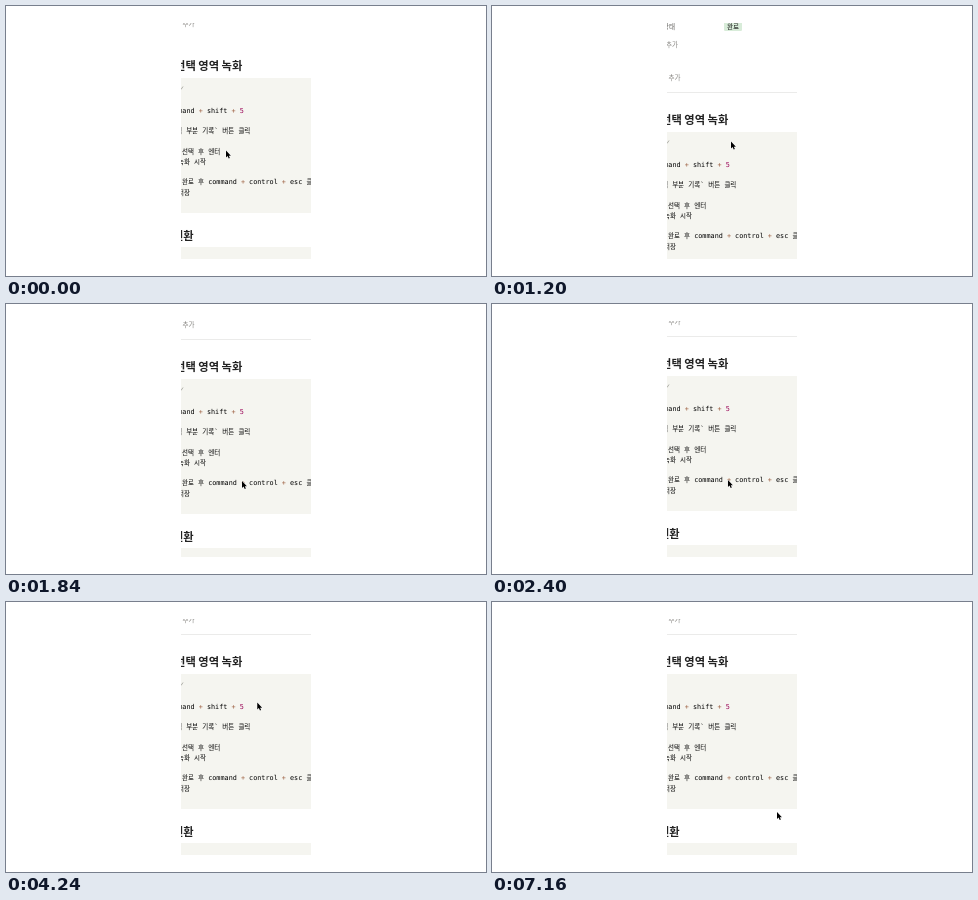
An HTML page with a canvas for the animation above (7760 ms loop, 480 by 270 pixels).

```html
<!DOCTYPE html>
<html lang="ko">
<head>
<meta charset="utf-8">
<style>
html, body { margin: 0; width: 100%; height: 100%; overflow: hidden; background: #fff; }
canvas { display: block; }
</style>
</head>
<body>
<canvas id="stage" width="480" height="270"></canvas>
<script>
const ctx = document.getElementById('stage').getContext('2d');
const LOOP = 7760, STEP = 40;
const LEFT = 175, TOP = 17, WIDTH = 130, HEIGHT = 236;
const SANS = '"Noto Sans CJK KR", "Noto Sans CJK", sans-serif';
const MONO = '"DejaVu Sans Mono", monospace';
const INK = '#111', GRAY = '#83817d', BLOCK = '#f5f5f0';

const snippet = `
command + shift + 5

\`선택 부분 기록\` 버튼 클릭

영역 선택 후 엔터
화면녹화 시작

녹화 완료 후 command + control + esc 클릭
자동저장`.split('\n');

// Pointer moves; it rests in between
const moves = [
  { from: 800, to: 1200, x: 239, y: 135.5 },
  { from: 1200, to: 1520, x: 237.5, y: 178.5 },
  { from: 1520, to: 1840, x: 236, y: 177 },
  { from: 2360, to: 2960, x: 233, y: 100 },
  { from: 3240, to: 3600, x: 240, y: 60 },
  { from: 3600, to: 3920, x: 247, y: 89 },
  { from: 4200, to: 4400, x: 288, y: 199 },
  { from: 5160, to: 5760, x: 285, y: 210 }
];
const arrow = new Path2D('M0 0V7L1.6 5.6 2.7 8 3.9 7.5 2.8 5.2H4.9Z');

const progress = (t, from, to) => Math.max(0, Math.min(1, (t - from) / (to - from)));
const smooth = k => k * k * (3 - 2 * k);

// Scroll up with a soft stop, then flick back down
function scrollAt(t) {
  const left = t < 1600
    ? 1 - (1 - progress(t, 800, 1560)) ** 1.55
    : (1 - progress(t, 1600, 2000)) ** 3.4;
  return Math.round(78.3 * left);
}

function pointerAt(t) {
  let x = 220, y = 144.5;
  for (const m of moves) {
    const k = smooth(progress(t, m.from, m.to));
    x += (m.x - x) * k;
    y += (m.y - y) * k;
  }
  return [x, y];
}

function box(x, y, w, h, color) {
  ctx.fillStyle = color;
  ctx.fillRect(x, y, w, h);
}

function text(str, x, y, size, color, align = 'right', weight = 400) {
  ctx.font = `${weight} ${size}px ${SANS}`;
  ctx.textAlign = align;
  ctx.fillStyle = color;
  ctx.fillText(str, x, y + size * 0.38);
}

// Hangul in the sans face, the rest monospaced, with operators and numbers tinted
function code(str, y) {
  let x = 160;
  ctx.textAlign = 'left';
  for (const run of str.match(/[가-힣]+|[+5]|[^가-힣+5]+/g) || []) {
    ctx.font = /[가-힣]/.test(run) ? `500 6.5px ${SANS}` : `6.8px ${MONO}`;
    ctx.fillStyle = { '+': '#9a5a3a', '5': '#990055' }[run] || '#000';
    ctx.fillText(run, x, y + 2.5);
    x += ctx.measureText(run).width;
  }
}

function properties() {
  text('2023년 12월 7일', 232.5, -53.5, 7.1, INK, 'left');
  text('상태', 183, -34, 6.6, '#5f5e5b');
  ctx.fillStyle = '#d8ecd9';
  ctx.beginPath();
  ctx.roundRect(232, -38, 18, 9, 1.2);
  ctx.fill();
  text('완료', 241, -34, 6.6, INK, 'center', 500);
  text('속성 추가', 186, -15, 6.5, GRAY);
  text('댓글 추가', 188.5, 17.8, 6.5, GRAY);
}

function page(t, scroll) {
  properties();
  // Only one hairline survives at a time
  if (t >= 800) box(LEFT, scroll > 65 ? 1 : 32, WIDTH, 1, '#ebebea');

  text('선택 영역 녹화', 236.3, 60, 11.25, '#222', 'right', 700);
  const selected = t >= 2680 && t < 3600;
  box(LEFT, 72, WIDTH, 135, selected ? '#dbe5ef' : BLOCK);
  if (t < 5600) {
    ctx.strokeStyle = '#909088';
    ctx.lineWidth = 0.7;
    ctx.stroke(new Path2D('M175 83.5L177 80.5'));
  }
  snippet.forEach((str, i) => code(str, 93.75 + (i) * 10.25 - (i ? 0 : 10.25)));

  text('변환', 187.6, 229.3, 11.25, '#222', 'right', 700);
  box(LEFT, 241, WIDTH, 60, BLOCK);
}

function pointer(x, y) {
  ctx.save();
  ctx.translate(x, y);
  ctx.lineJoin = 'round';
  ctx.strokeStyle = '#fff';
  ctx.lineWidth = 1;
  ctx.stroke(arrow);
  ctx.fillStyle = '#000';
  ctx.fill(arrow);
  ctx.restore();
}

function draw(now) {
  const t = Math.floor(now % LOOP / STEP) * STEP;
  const scroll = scrollAt(t);
  box(0, 0, 480, 270, '#fff');
  ctx.save();
  ctx.beginPath();
  ctx.rect(LEFT, TOP, WIDTH, HEIGHT);
  ctx.clip();
  ctx.translate(0, scroll);
  page(t, scroll);
  ctx.restore();
  pointer(...pointerAt(t));
}

const start = performance.now();
function tick() {
  draw(performance.now() - start);
  requestAnimationFrame(tick);
}
tick();
</script>
</body>
</html>
```
